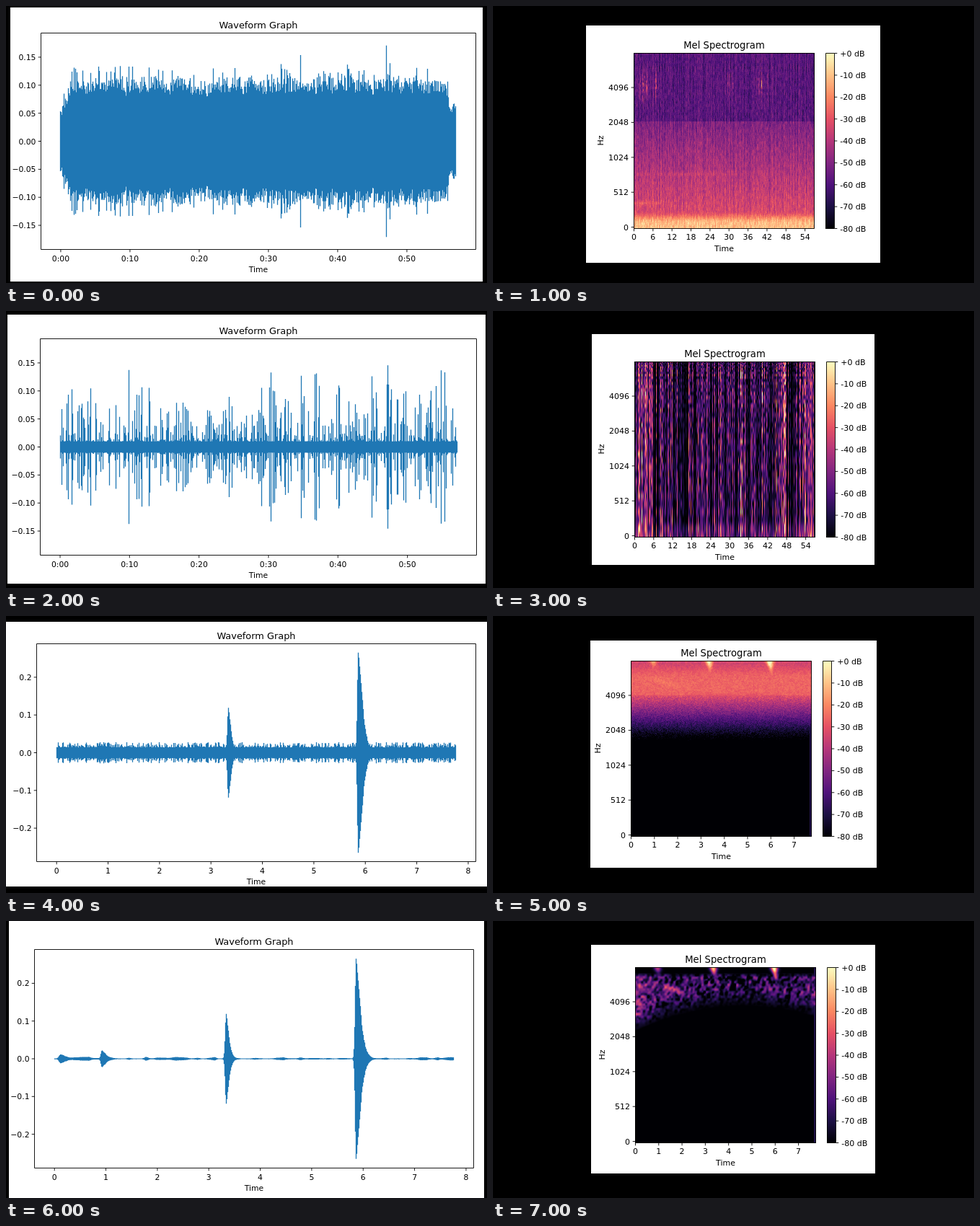
An HTML page with a canvas for the animation above (8000 ms loop, 667 by 384 pixels).

```html
<!DOCTYPE html>
<html lang="en">
<head>
<meta charset="utf-8">
<title>Audio plots</title>
<style>
  html, body { margin: 0; width: 100%; height: 100%; overflow: hidden; background: #000; }
  #stage { position: relative; width: 667px; height: 384px; overflow: hidden; }
  #strip { position: absolute; inset: 0 auto auto 0; animation: flip 8s steps(8) infinite; }
  @keyframes flip { to { transform: translateY(-3072px); } }
  section { position: relative; width: 667px; height: 384px; overflow: hidden; background: #000; }
  section > * { position: absolute; left: 0; top: 0; }
  .paper { background: #fff; }
  text { font-family: "DejaVu Sans", sans-serif; fill: #000; }
  .axis { fill: none; stroke: #000; stroke-width: .9; }
  .wave { fill: none; stroke: #1f77b4; stroke-width: 1.3; }
</style>
</head>
<body>
<div id="stage"><div id="strip"></div></div>
<script>
const strip = document.getElementById('strip');

// --- helpers ---
const hash = (x, y) => {
  let h = Math.imul(x + 17, 374761393) ^ Math.imul(y + 59, 668265263);
  h = Math.imul(h ^ (h >>> 13), 1274126177);
  h = Math.imul(h ^ (h >>> 15), 2246822519);
  return ((h ^ (h >>> 16)) >>> 0) / 4294967296;
};
const mix = (a, b, k) => a + (b - a) * k;
const ease = k => k * k * (3 - 2 * k);
const clamp = t => Math.max(0, Math.min(1, t));
const ramp = (a, b, x) => ease(clamp((x - a) / (b - a)));
const bell = (d, w) => Math.exp(-(d * d) / (w * w));
const smooth = (x, y) => {
  const i = Math.floor(x), j = Math.floor(y), k = ease(x - i), l = ease(y - j);
  return mix(mix(hash(i, j), hash(i + 1, j), k), mix(hash(i, j + 1), hash(i + 1, j + 1), k), l);
};

const MAGMA = [[0, 0, 4], [28, 16, 68], [79, 18, 123], [129, 37, 129], [181, 54, 122],
  [229, 80, 100], [251, 135, 97], [254, 194, 135], [252, 253, 191]];
const magma = t => {
  const p = clamp(t) * 8, i = Math.min(7, Math.floor(p));
  return MAGMA[i].map((c, n) => mix(c, MAGMA[i + 1][n], p - i));
};

const label = (s, x, y, size, anchor = 'middle', extra = '') =>
  `<text x="${x}" y="${y}" font-size="${size}" text-anchor="${anchor}" ${extra}>${s}</text>`;
const box = (x, y, w, h) => `M${x} ${y}h${w}v${h}h${-w}z`;

function scene([x, y, w, h]) {
  const el = document.createElement('section');
  el.innerHTML = `<div class="paper" style="left:${x}px;top:${y}px;width:${w}px;height:${h}px"></div>`;
  strip.append(el);
  return el;
}
const overlay = (el, body) =>
  el.insertAdjacentHTML('beforeend', `<svg width="667" height="384">${body}</svg>`);

// --- waveform plot ---
function waveform({ paper, axes: [x, y, w, h], secs, step, stepY, ticksY, scale, timeText, env }) {
  const cy = y + h / 2, x0 = x + w / 22, span = w / 1.1, bottom = y + h;
  const left = Math.floor(x0) + .5;
  let wave = '', axis = box(x, y, w, h), text = '';
  for (let px = 0; px <= span; px++) {
    const a = Math.max(.5, env(px / span * secs, px) * scale);
    wave += `M${left + px} ${(cy - a).toFixed(1)}v${(2 * a).toFixed(1)}`;
  }
  for (let s = 0; s <= secs * 1.05; s += step) {
    const tx = x0 + s / secs * span;
    axis += `M${tx} ${bottom}v3.8`;
    text += label(timeText(s), tx, bottom + 16.3, 10.8);
  }
  for (let n = -ticksY; n <= ticksY; n++) {
    const v = n * stepY, ty = cy - v * scale;
    axis += `M${x} ${ty}h-3.8`;
    text += label((n < 0 ? '−' : '') + Math.abs(v).toFixed(stepY < .1 ? 2 : 1), x - 7, ty + 4, 10.8, 'end');
  }
  text += label('Waveform Graph', x + w / 2, y - 6.8, 12.9) + label('Time', x + w / 2, bottom + 31.6, 10.8);
  overlay(scene(paper), `<path class="wave" d="${wave}"/><path class="axis" d="${axis}"/>${text}`);
}

// --- mel spectrogram plot ---
const W = 251, H = 244, BAR = 266;
function mel({ paper, at: [x, y], step, last, gap, level }) {
  const el = scene(paper), cv = document.createElement('canvas');
  cv.width = BAR + 12;
  cv.height = H;
  cv.style.cssText = `left:${x}px;top:${y}px`;
  const ctx = cv.getContext('2d'), img = ctx.createImageData(cv.width, H);
  for (let j = 0, p = 0; j < H; j++) {
    for (let i = 0; i < cv.width; i++, p += 4) {
      if (i >= W && i < BAR) continue;
      const v = j / (H - 1);
      img.data.set([...magma(i < W ? level(i / W, v, i, j) : 1 - v), 255], p);
    }
  }
  ctx.putImageData(img, 0, 0);
  el.append(cv);

  const l = x + .5, t = y + .5, b = t + H - 1, mid = l + 125;
  let axis = box(l, t, W - 1, H - 1) + box(l + BAR, t, 12, H - 1), text = '';
  [4096, 2048, 1024, 512, 0].forEach((hz, n) => {
    const ty = t + 47.5 + n * 48.4;
    axis += `M${l} ${ty}h-3.8`;
    text += label(hz, l - 7.5, ty + 4, 11, 'end');
  });
  for (let s = 0, tx = l; s <= last; s += step, tx += gap) {
    axis += `M${tx} ${b}v3.8`;
    text += label(s, tx, b + 15.6, 11);
  }
  for (let n = 0; n <= 8; n++) {
    const ty = t + n * (H - 1) / 8;
    axis += `M${l + BAR + 12} ${ty}h3.8`;
    text += label(n ? `-${n * 10} dB` : '+0 dB', l + BAR + 19.7, ty + 4, 11, 'start');
  }
  text += label('Mel Spectrogram', mid, t - 7, 13.2) + label('Time', mid, b + 31.7, 11)
    + label('Hz', 0, 0, 11, 'middle', `transform="translate(${l - 43} ${t + 121}) rotate(-90)"`);
  overlay(el, `<path class="axis" d="${axis}"/>${text}`);
}

// --- recording one: a minute of steady noise ---
const fade = t => mix(.45, 1, ramp(-.3, 1.8, t)) * mix(1, .6, ramp(55.6, 56.5, t));
const peak = t => .156 * bell(t - 1.7, .07) + .16 * bell(t - 34.7, .07) + .175 * bell(t - 47.1, .12);
const noisyMinute = (t, px) => Math.max(peak(t), fade(t) * (1 - .12 * bell(t - 20.5, 2))
  * (.079 + .012 * smooth(px / 9, 4) + .026 * hash(px, 1) + .034 * hash(px, 8) ** 6));
const cleanMinute = (t, px) =>
  Math.max(peak(t) * .9, .01 + fade(t) * .12 * hash(px, 2) ** 4 * (.3 + smooth(px / 6, 3)));
const minute = { secs: 57.1, step: 10, stepY: .05, ticksY: 3, scale: 777,
  timeText: s => '0:' + String(s).padStart(2, '0') };

const flares = (u, v) => bell(v - .19, .08) * (.5 * bell(u - .05, .03)
  + .42 * bell(u - .12, .02) + .35 * bell(u - .53, .02) + .4 * bell(u - .71, .03));
const noisyTone = v => (v < .39 ? .27 : .36 + .44 * (v - .39)) + .25 * ramp(.9, .97, v);
const noisyMel = (u, v, i, j) =>
  noisyTone(v) + (v < .9 ? .1 : .04) * (hash(i, 5) - .5)
  + .13 * (smooth(i, j / 4) - .5) + .06 * (hash(i, j + 400) - .5)
  + .05 * bell(v - .69, .012) * bell(u - .3, .25) + .08 * bell(v - .855, .012) * bell(u - .08, .12)
  + 1.3 * flares(u, v) * hash(i, 7) ** 2 * smooth(i, j / 3 + 200);
const cleanMel = (u, v, i) => {
  const streak = .55 * hash(i, 11) ** 2 + .45 * smooth(i / 4, 9) ** 2;
  const edges = bell(u - .03, .04) * mix(.6, 1, v) + bell(u - .97, .02);
  return (streak + .2 * edges) * (.35 + 1.1 * smooth(i, 40 * Math.sqrt(v))) - .14
    + .12 * edges + .14 * ramp(.88, .98, v) + .8 * flares(u, v) * hash(i, 7) ** 2;
};

// --- recording two: three short bursts ---
const burst = (d, amp, tail) => amp * (d < 0 ? bell(d, .028) : Math.exp(-((d / tail) ** 1.5)));
const hum = t => .0012 + .004 * smooth(t * 9, 31) ** 4 + ramp(.04, .12, t) * .007 * bell(t - .1, .12)
  + .003 * bell(t - .5, .25) + .003 * bell(t - 7.7, .15);
const cleanBursts = (t, px) => (.9 + .1 * hash(px, 21))
  * (hum(t) + burst(t - .92, .022, .1) + burst(t - 3.335, .122, .07) + burst(t - 5.86, .265, .11));
const noisyBursts = (t, px) => Math.max(cleanBursts(t, px), .014 + .014 * hash(px, 22) ** 2);
const short = { secs: 7.76, step: 1, stepY: .1, ticksY: 2, scale: 523, timeText: s => s };

const pop = (u, v, at, amp, len) =>
  amp * bell(u - at - v * .15, Math.max(.007, .021 - v * .22)) * bell(v, len);
const pops = (u, v) =>
  pop(u, v, .122, .35, .03) + pop(u, v, .43, .6, .043) + pop(u, v, .766, .7, .048);
const ridge = (u, v) => bell(v - .1 - Math.max(0, u - .12) * .3, .018) * bell(u - .19, .1);
const lastColumn = (i, t) => i > W - 4 ? Math.max(t, .13) : t;
const highTone = v => Math.min(.57 + .1 * ramp(0, .1, v), .63 - 2.62 * (v - .19));
const noisyHigh = (u, v, i, j) => lastColumn(i, highTone(v)
  + .06 * (smooth(i / 2, j / 2) - .5) + (v > .2 ? .12 : .05) * (hash(i, j) - .5)
  + .04 * ridge(u, v) + .05 * bell(v - .19, .006) * smooth(i / 12, 31) + .7 * pops(u, v));
const cleanHigh = (u, v, i, j) => {
  const low = .22 + .4 * (u - .6) ** 2, dense = bell(u, .1) * .26 + bell(u - 1, .1) * .13;
  const inside = clamp((v - .03) * 40) * clamp((low - v) * 10);
  const blob = smooth(i / 4 + j / 15, j / 5) * .6 + smooth(i / 3, j / 3.4 + 90) * .45;
  return lastColumn(i, inside * Math.max(0, blob - .34 + dense) * .75
    + .25 * ridge(u, v) * inside + 1.5 * pops(u, v));
};

// --- eight scenes, one second each ---
const longTicks = { step: 6, last: 54, gap: 26.35 }, shortTicks = { step: 1, last: 7, gap: 32.3 };
waveform({ ...minute, paper: [6, 2, 655, 380], axes: [48.5, 37.5, 603, 300], env: noisyMinute });
mel({ ...longTicks, paper: [129, 27, 408, 329], at: [195, 65], level: noisyMel });
waveform({ ...minute, paper: [2, 5, 663, 373], axes: [47.5, 38.5, 605, 300], env: cleanMinute });
mel({ ...longTicks, paper: [137, 32, 392, 320], at: [196, 70], level: cleanMel });
waveform({ ...short, paper: [0, 8, 667, 367], axes: [42.5, 38.5, 609, 302], env: noisyBursts });
mel({ ...shortTicks, paper: [135, 34, 397, 315], at: [191, 62], level: noisyHigh });
waveform({ ...short, paper: [4, 0, 659, 384], axes: [39.5, 39.5, 609, 303], env: cleanBursts });
mel({ ...shortTicks, paper: [136, 33, 394, 317], at: [197, 64], level: cleanHigh });
</script>
</body>
</html>
```
